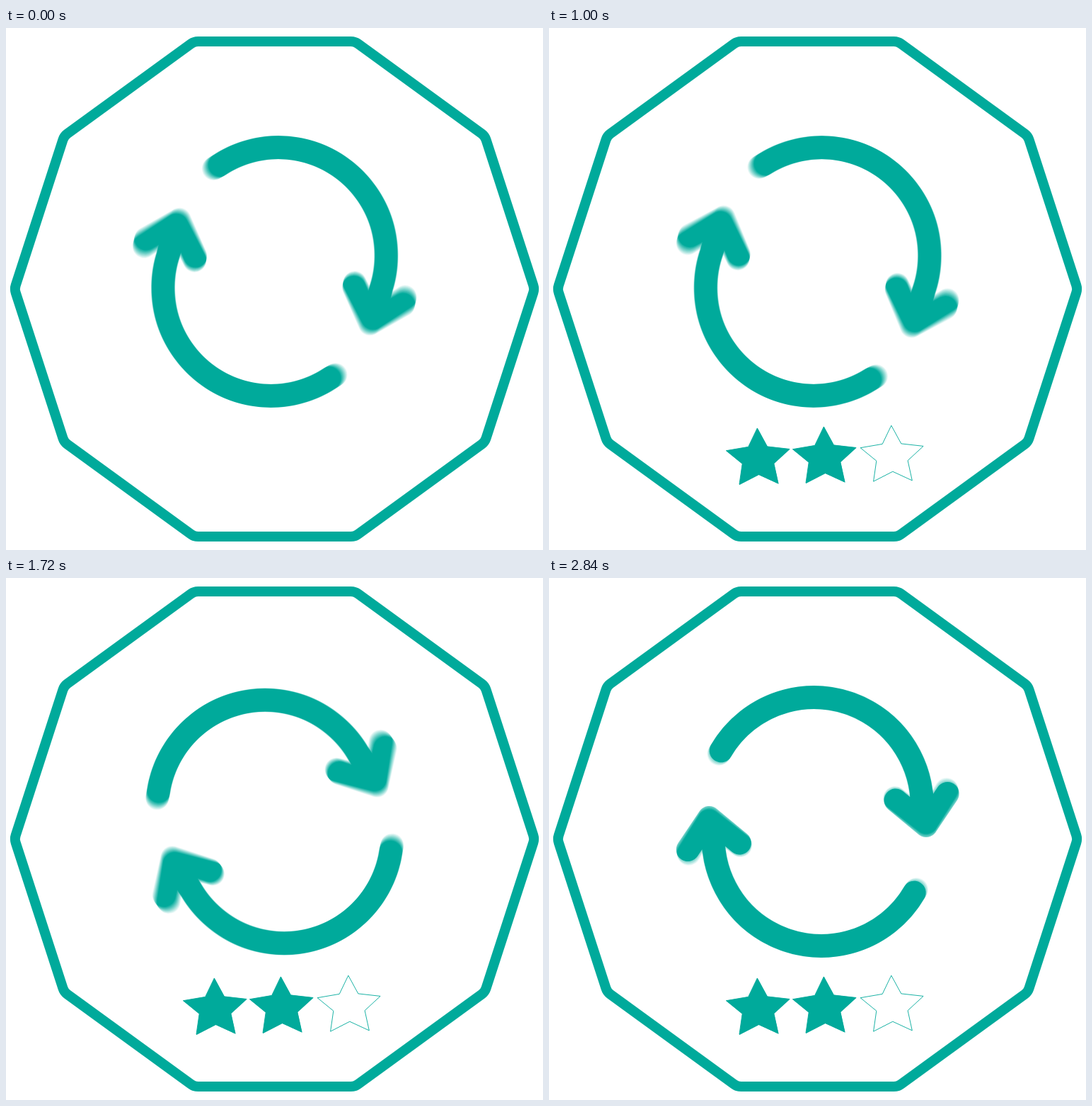
Animation of 759 by 737 pixels, one loop 2.88 s. Source, as an HTML page with a canvas:

```html
<!DOCTYPE html>
<html lang="en">
<head>
<meta charset="utf-8">
<title>Cycle and stars</title>
<style>
html, body { margin: 0; width: 100%; height: 100%; overflow: hidden; background: #fff; }
canvas { display: block; }
</style>
</head>
<body>
<canvas id="stage" width="759" height="737"></canvas>
<script>
const ctx = document.getElementById('stage').getContext('2d');
const W = 759, H = 737;
const TEAL = '#00aa9b';
const LOOP = 2880, STEP = 40;
const RAD = Math.PI / 180;

const START = 24.85, SPEED = 7.255, END = 540; // degrees, degrees per step
const SHUTTER = 3.6, SAMPLES = 15;             // motion blur

const clamp01 = v => Math.max(0, Math.min(1, v));
const ramp = (t, from, length) => clamp01((t - from) / length);

function makeArrows() {
  const one = new Path2D();
  one.arc(-4.9, -23, 152.5, -149.6 * RAD, 5 * RAD);
  one.lineTo(153.3, 5.5);
  one.moveTo(110.3, -30);
  one.lineTo(153.3, 5.5);
  one.lineTo(183.5, -39.5);
  const both = new Path2D(one);
  both.addPath(one, new DOMMatrix([-1, 0, 0, -1, 0, 0]));
  return both;
}

function makeDecagon(cx, cy, radius, corner) {
  const at = i => [cx + radius * Math.cos(i * 36 * RAD), cy + radius * Math.sin(i * 36 * RAD)];
  const path = new Path2D();
  const [ax, ay] = at(0), [bx, by] = at(1);
  path.moveTo((ax + bx) / 2, (ay + by) / 2);
  for (let i = 1; i <= 10; i++) path.arcTo(...at(i), ...at(i + 1), corner);
  path.closePath();
  return path;
}

// Points relative to the star's top
function makeStar() {
  const points = [
    [0, 0], [14, 25.7], [45.3, 29.2], [23.3, 49.5], [29.5, 77.7],
    [2, 65], [-25.2, 79], [-21, 50], [-43.7, 31.5], [-12.6, 26.2]
  ];
  const path = new Path2D();
  points.forEach(p => path.lineTo(...p));
  path.closePath();
  return path;
}

const arrows = makeArrows();
const decagon = makeDecagon(379.5, 368.5, 367.5, 17);
const star = makeStar();

const stars = [
  { x: 294.2, y: 565.2, line: 120, fill: 480 },
  { x: 388.2, y: 563.2, line: 280, fill: 640 },
  { x: 483.8, y: 561.2, line: 480, fill: Infinity }
];

function drawArrows(step) {
  const mid = START + SPEED * step;
  ctx.save();
  ctx.globalCompositeOperation = 'lighter';
  ctx.globalAlpha = 1 / SAMPLES;
  ctx.strokeStyle = '#000';
  ctx.lineWidth = 33;
  ctx.lineCap = ctx.lineJoin = 'round';
  for (let i = 0; i < SAMPLES; i++) {
    const offset = SHUTTER * (i / (SAMPLES - 1) - 0.5);
    ctx.save();
    ctx.translate(379.7, 344);
    ctx.rotate(Math.min(mid + offset, END) * RAD);
    ctx.stroke(arrows);
    ctx.restore();
  }
  ctx.restore();

  // Tint the accumulated coverage
  ctx.save();
  ctx.globalCompositeOperation = 'source-in';
  ctx.fillStyle = TEAL;
  ctx.fillRect(0, 0, W, H);
  ctx.restore();
}

function drawStar(s, t) {
  ctx.save();
  ctx.translate(s.x, s.y);
  ctx.fillStyle = ctx.strokeStyle = TEAL;
  ctx.save();
  ctx.translate(0.4, -0.6);
  ctx.scale(1.02, 1.02);
  ctx.globalAlpha = ramp(t, s.fill, 320);
  ctx.fill(star);
  ctx.restore();
  ctx.globalAlpha = ramp(t, s.line, 120);
  ctx.lineWidth = 0.9;
  ctx.stroke(star);
  ctx.restore();
}

function draw(step) {
  const t = step * STEP;
  ctx.clearRect(0, 0, W, H);
  drawArrows(step);
  ctx.strokeStyle = TEAL;
  ctx.lineWidth = 14;
  ctx.stroke(decagon);
  stars.forEach(s => drawStar(s, t));
}

const began = performance.now();
function tick() {
  const t = (performance.now() - began) % LOOP;
  draw(Math.floor(t / STEP));
  requestAnimationFrame(tick);
}
tick();
</script>
</body>
</html>
```
